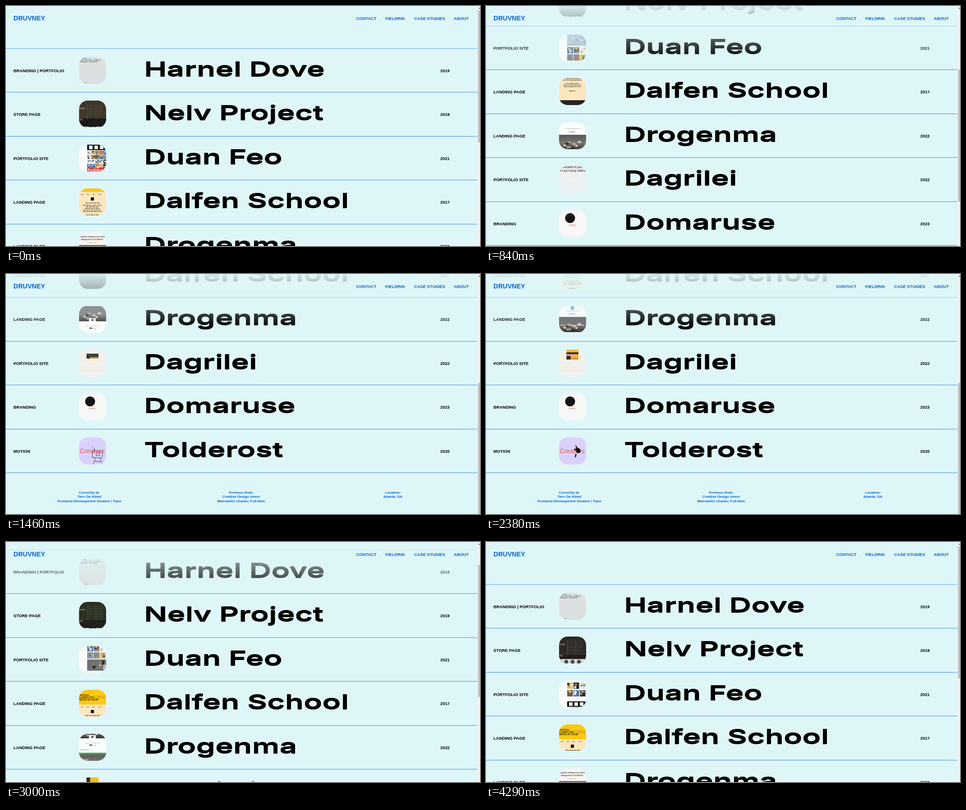
An HTML page with a canvas that plays this animation: 1051x533 px, repeating every 4360 ms.

```html
<!DOCTYPE html>
<html lang="en">
<head>
<meta charset="utf-8">
<title>Portfolio index</title>
<style>
  html, body { margin: 0; width: 100%; height: 100%; overflow: hidden; background: #dff6f9; }
  canvas { display: block; width: 100vw; height: 100vh; }
</style>
</head>
<body>
<canvas id="stage" width="1051" height="533"></canvas>
<script>
const ctx = document.getElementById('stage').getContext('2d');
const W = 1051, H = 533, LOOP = 4360;
const BG = '#dff6f9', BLUE = '#0564cf', LINE = '#3a8adb';
const SANS = '"Liberation Sans", Arial, sans-serif';
const MONO = '"Liberation Mono", monospace';
const WIDE = 'Inter, "Open Sans", sans-serif';
const TOP = 94, PITCH = 97.5, MAX_SCROLL = 432.5;
const THUMB = { x: 162, dy: 19, size: 60, r: 19 };

const rows = [
  ['BRANDING | PORTFOLIO', 'Harnel Dove', '2019', studioThumb],
  ['STORE PAGE', 'Nelv Project', '2019', storeThumb],
  ['PORTFOLIO SITE', 'Duan Feo', '2021', collageThumb],
  ['LANDING PAGE', 'Dalfen School', '2017', schoolThumb],
  ['LANDING PAGE', 'Drogenma', '2022', interiorThumb],
  ['PORTFOLIO SITE', 'Dagrilei', '2022', mosaicThumb],
  ['BRANDING', 'Domaruse', '2023', markThumb],
  ['MOTION', 'Tolderost', '2020', motionThumb]
];
const footer = [
  [185, ['Currently at:', 'Tarn On Allied', 'Frontend Development Student / Tutor']],
  [521.5, ['Previous Role:', 'Creative Design Intern', 'Marrowfen Charter, Full-time']],
  [858, ['Location:', 'Atlanta, GA']]
];
const nav = [[776.5, 'CONTACT'], [841, 'FIELDRIN'], [905, 'CASE STUDIES'], [993, 'ABOUT']];

// Bursts of evenly spaced refreshes: first time, last time, count.
const bursts = [
  [140, 600, 7], [680, 1150, 7], [1220, 1690, 7], [1770, 2230, 7],
  [2310, 2780, 7], [2850, 3310, 7], [3400, 3890, 8], [3960, 4290, 6]
];

function heldTime(t) {
  let held = 0;
  for (const [from, to, n] of bursts) {
    if (t < from) break;
    const step = (to - from) / (n - 1);
    held = from + Math.min(n - 1, Math.floor((t - from + 9) / step)) * step;
  }
  return held;
}

const clamp = v => Math.max(0, Math.min(1, v));
const smooth = v => { const c = clamp(v); return c * c * (3 - 2 * c); };
const rand = n => { const v = Math.sin(n * 127.1 + 11.7) * 43758.5453; return v - Math.floor(v); };

function keyed(t, keys) {
  for (let i = 1; i < keys.length; i++) {
    const [t0, v0] = keys[i - 1], [t1, v1] = keys[i];
    if (t <= t1) return v0 + (v1 - v0) * clamp((t - t0) / (t1 - t0));
  }
  return keys[keys.length - 1][1];
}

function scrollAt(t) {
  return MAX_SCROLL * (smooth((t - 347.3) / 900) - smooth((t - 2461.6) / 740));
}

function box(x, y, w, h, color) {
  ctx.fillStyle = color;
  ctx.fillRect(x, y, w, h);
}

function disc(x, y, r, color) {
  ctx.fillStyle = color;
  ctx.beginPath();
  ctx.arc(x, y, r, 0, Math.PI * 2);
  ctx.fill();
}

function text(str, x, y, font, color, align = 'left') {
  ctx.font = font;
  ctx.fillStyle = color;
  ctx.textAlign = align;
  ctx.fillText(str, x, y);
}

function poly(points, color, width) {
  ctx.beginPath();
  points.forEach(([x, y]) => ctx.lineTo(x, y));
  if (width) {
    ctx.strokeStyle = color;
    ctx.lineWidth = width;
    ctx.stroke();
  } else {
    ctx.fillStyle = color;
    ctx.fill();
  }
}

// A row of short dashes standing for very small copy.
function smallPrint(x, y, w, color, seed) {
  for (let dx = 0, i = 0; dx < w; i++) {
    const len = Math.min(w - dx, 2 + rand(seed + i) * 5);
    box(x + dx, y, len, 1, color);
    dx += len + 1.2;
  }
}

function photo(y, h, seed) {
  const g = ctx.createLinearGradient(0, y, 0, y + h);
  g.addColorStop(0, '#55575a');
  g.addColorStop(0.55, '#77746e');
  g.addColorStop(1, '#34332f');
  ctx.fillStyle = g;
  ctx.fillRect(0, y, 60, h);
  for (let i = 0; i < 9; i++) {
    const shade = ['#2b2c2d', '#a29a8d', '#c6c3bc'][Math.floor(rand(seed + i) * 3)];
    box(rand(seed + i + 20) * 54, y + h * (0.35 + rand(seed + i + 40) * 0.5), 3 + rand(seed + i + 60) * 8, h * 0.13, shade);
  }
}

// Thumbnails draw in a 60 by 60 box whose corner is the origin.
function studioThumb() {
  box(0, 0, 60, 60, '#dcdfe0');
  const font = 'bold 4.4px ' + MONO;
  text('YOUR', 5, 4, font, '#444');
  text('UNIQUE DESIGN STUDIO', -6, 8, font, '#444');
  text('DIGITAL PARTNER', 1, 12, font, '#444');
  box(20, 20, 0.6, 22, '#cbcfd0');
  smallPrint(27, 22, 8, '#c6cacb', 3);
  smallPrint(40, 27, 7, '#c6cacb', 6);
  box(12, 57, 5, 1, '#777');
}

function storeThumb(t) {
  const early = t < 700, late = t > 3300;
  box(0, 0, 60, 60, early ? '#40362a' : late ? '#2c2924' : '#2a2f22');
  box(0, 38, 60, 22, early ? '#1a1c1c' : '#211f1b');
  for (let i = 0; i < 6; i++) {
    smallPrint(19, 10 + i * 4.5, 34, early ? '#6b4c38' : '#575a4b', i * 9);
  }
  box(18, 8, 0.6, 34, '#62635a');
  box(37, 8, 0.6, 34, '#55564e');
  box(0, 38, 60, 0.7, '#62635a');
  text('calendar', -9, 19, '6px ' + SANS, '#c9c8c1');
  text('goods', -8, 44, '6px ' + SANS, '#c9c8c1');
  if (t > 3900) {
    box(0, 50, 60, 10, '#deded9');
    for (let i = 0; i < 4; i++) disc(2 + i * 14, 56, 4.5, '#4b4c4f');
  } else {
    box(0, 58, 60, 2, BG);
    smallPrint(22, 58, 16, '#333', 4);
  }
}

function collageThumb(t) {
  const page = 226, left = 18;
  const offset = keyed(t, [[0, 0], [840, 62], [2200, 86], [3000, 92], [3550, 120], [4290, 180]]);
  const tones = ['#2b2b2b', '#e4e2dd', '#b9854e', '#4a77b0', '#8c8f91', '#d8c27a', '#f1f1f1', '#6b5a48'];
  const tone = n => tones[Math.floor(rand(n) * tones.length)];
  const tiles = (y, count, cell, gap, seed) => {
    for (let r = 0; r < count; r++) {
      for (let c = 0; c < 42 / cell; c++) {
        const n = seed + r * 13 + c * 3, x = left + c * cell, top = y + r * (cell + gap);
        box(x, top, cell - gap / 2, cell, tone(n));
        for (let i = 1; i < 4; i++) {
          box(x + rand(n + i) * cell * 0.6, top + rand(n + i * 2) * cell * 0.6, cell * 0.35, cell * 0.35, tone(n + i * 7));
        }
      }
    }
  };
  box(0, 0, 60, 60, '#fbfcfc');
  smallPrint(4, 9, 8, '#d5dadb', 2);
  smallPrint(3, 30, 10, '#dde1e2', 5);
  for (const y of [-offset, page - offset]) {
    box(left, y, 42, 12, '#0c0c0c');
    for (let i = 0; i < 3; i++) box(left + 4 + i * 12, y + 2, 8, 8, '#eceeed');
    tiles(y + 13, 4, 9, 1, 30);
    box(left, y + 52, 42, 10, '#d81e1e');
    text('hobby', left + 1, y + 60, 'bold 11px ' + SANS, '#fff');
    box(left, y + 62, 42, 25, '#a9bccd');
    for (let i = 0; i < 12; i++) box(left + rand(i) * 38, y + 64 + rand(i + 30) * 20, 5, 2, i % 2 ? '#d4dce2' : '#7d94a8');
    tiles(y + 90, 2, 14, 2, 71);
    box(left, y + 122, 42, 25, '#6d7276');
    for (let i = 0; i < 10; i++) box(left + rand(i + 7) * 36, y + 123 + rand(i + 17) * 17, 6, 6, ['#28292b', '#b8bbba', '#9a8055'][i % 3]);
    text('&', left + 25, y + 161, '13px "Liberation Serif", serif', '#333');
    text('68', left + 16, y + 176, '16px "Liberation Serif", serif', '#333');
    for (let i = 0; i < 4; i++) smallPrint(left + 1, y + 152 + i * 6, 15, '#9da0a1', i * 8);
    tiles(y + 184, 2, 14, 3, 120);
  }
}

function schoolThumb(t) {
  const offset = keyed(t, [[0, 25], [840, 72], [1460, 100], [2380, 42], [3000, 0], [4290, 0]]);
  const y = -offset, ink = '#17150f';
  box(0, 0, 60, 60, '#fbe6bd');
  box(0, y, 60, 33, '#ffc90f');
  ['PRACTICAL', 'CLASSES FOR', 'PEOPLE OF COLOR'].forEach((line, i) =>
    text(line, i ? -1 : -3, y + 14 + i * 5, 'bold 4.5px ' + SANS, ink));
  smallPrint(31, y + 14, 28, '#8b6c12', 2);
  smallPrint(31, y + 18, 28, '#8b6c12', 7);
  for (let i = 0; i < 4; i++) box(4 + i * 13, y + 38, 5, 1, '#5b4f34');
  box(26, y + 45, 7, 7, ink);
  smallPrint(14, y + 57, 32, ink, 4);
  for (let i = 0; i < 8; i++) {
    const w = 24 + rand(i + 4) * 18;
    smallPrint(29.5 - w / 2, y + 62 + i * 3.5 + (i > 4 ? 4 : 0), w, ink, i * 11);
  }
  smallPrint(22, y + 100, 14, ink, 8);
  box(0, y + 121, 60, 60, '#242326');
}

function interiorThumb(t) {
  const offset = keyed(t, [[0, 0], [840, 0], [1460, 27], [2380, 2], [3000, 52], [3550, 52], [4290, 0]]);
  const y = -offset, greeting = t < 500 || t > 3950;
  box(0, 0, 60, 60, greeting ? '#f6f5f2' : '#fbfcfc');
  photo(y + 28, 34, 12);
  box(0, y + 62, 60, 32, '#fbfcfc');
  photo(y + 94, 34, 88);
  box(0, y + 94, 60, 4, '#4c9a53');
  if (greeting) {
    box(0, y, 60, 28, '#f6f5f2');
    text('beautiful software for interior', 29.5, y + 11, '5px ' + SANS, '#222', 'center');
    text('designers & architects.', 29.5, y + 17, '5px ' + SANS, '#222', 'center');
    box(34, y + 22, 5, 2, '#f3c533');
    smallPrint(18, y + 22, 14, '#999', 3);
  } else {
    smallPrint(14, y + 14, 32, '#a5a9aa', 6);
    smallPrint(22, y + 21, 14, '#444', 9);
  }
  if (t > 1900 && t < 2700) {
    disc(29.5, y + 8, 4.5, '#58a9d8');
    text('Presentations, perfected', 29.5, y + 48, 'bold 4.4px ' + SANS, '#fff', 'center');
  } else if (t > 1000 && !greeting) {
    box(22, y + 55, 15, 12, '#fff');
    box(27, y + 57, 5, 4, '#4c4d4f');
  }
  smallPrint(14, y + 72, 32, '#b4b8b9', 4);
  box(23, y + 76, 6, 2, '#222');
  smallPrint(32, y + 77, 6, '#999', 2);
  smallPrint(3, y + 87, 18, '#888', 7);
}

function mosaicThumb(t) {
  box(0, 0, 60, 60, t < 1150 ? '#eef0f1' : '#f2f0ec');
  if (t < 1150) {
    text('dedicated to you', 3, 5, '6.6px ' + SANS, '#222');
    text('in your busy calendar', 3, 12.5, '6.6px ' + SANS, '#222');
    smallPrint(16, 23, 28, '#cfe9f0', 5);
    return;
  }
  if (t < 1900) {
    box(16.5, 9, 26.5, 11, '#343638');
    box(24, 16.5, 19, 3.5, '#d99a2b');
    smallPrint(19, 12, 22, '#66686a', 3);
  } else if (t < 2700) {
    box(16.5, 0, 26.5, 22, '#f4b62c');
    box(16.5, 6, 26.5, 4, '#2b2b2d');
    box(16.5, 10, 9, 12, '#2b2b2d');
    box(16.5, 10, 20, 4, '#e9a2a3');
    box(25.5, 18, 17.5, 4, '#e58a2f');
  } else {
    box(16.5, 0, 26.5, 22, '#f8bd16');
    box(16.5, 0, 8, 22, '#27282a');
  }
  for (let i = 0; i < 3; i++) smallPrint(2, 40 + i * 4, 54, '#e4e3df', i * 9);
}

function markThumb() {
  box(0, 0, 60, 60, '#f7f7f5');
  disc(24.5, 18, 11, '#141414');
  text('FORM', 28.5, 36, '5px ' + SANS, '#e2674c', 'center');
}

function motionThumb(t) {
  box(0, 0, 60, 60, '#d9d1fb');
  text('Creators', 1.5, 35, '14.3px ' + SANS, '#ee5a47');
  if (Math.floor(t / 600) % 2) {
    poly([[36, 15], [40, 22], [47, 26], [48, 33], [41, 35], [37, 30], [32, 25], [38, 25]], '#111');
    poly([[36, 37], [39, 36], [37, 45], [35, 43]], '#111');
  } else {
    poly([[30, 30], [52, 31], [51, 46], [29, 44], [30, 30]], '#222', 0.8);
    poly([[36, 45], [32, 58]], '#222', 0.8);
    poly([[46, 46], [51, 58]], '#222', 0.8);
    poly([[34, 53], [49, 54]], '#222', 0.8);
    poly([[38, 35], [46, 34], [45, 41], [38, 40], [38, 35]], '#222', 0.8);
    poly([[29, 21], [35, 28], [33, 30]], '#222', 0.8);
  }
}

// The display face is an extended grotesque: one width factor for every title,
// and stacked passes that thicken the horizontal strokes.
function title(str, y) {
  ctx.save();
  ctx.translate(306, y);
  ctx.scale(1.54, 1);
  for (let rise = 0; rise <= 2; rise++) text(str, 0, -rise, '600 44px ' + WIDE, '#000');
  ctx.restore();
}

function drawRow([label, name, year, thumb], y, t) {
  const small = 'bold 9.33px ' + SANS;
  text(label, 16.5, y + 53, small, '#000');
  text(year, 963, y + 53, small, '#000');
  title(name, y + 63);
  ctx.save();
  ctx.translate(THUMB.x, y + THUMB.dy);
  ctx.beginPath();
  ctx.roundRect(0, 0, THUMB.size, THUMB.size, THUMB.r);
  ctx.clip();
  thumb(t);
  ctx.restore();
}

function drawFooter(y) {
  for (const [x, lines] of footer) {
    lines.forEach((line, i) => text(line, x, y + i * 9.5, 'bold 7.8px ' + SANS, BLUE, 'center'));
  }
}

function drawHeader() {
  const fade = ctx.createLinearGradient(0, 0, 0, 120);
  fade.addColorStop(0, 'rgba(223,246,249,0.94)');
  fade.addColorStop(1, 'rgba(223,246,249,0)');
  ctx.fillStyle = fade;
  ctx.fillRect(0, 0, 1046, 120);
  text('DRUVNEY', 16.5, 32, 'bold 14.4px ' + SANS, BLUE);
  for (const [x, label] of nav) text(label, x, 31, 'bold 9.33px ' + SANS, BLUE);
}

function drawScrollbar(scroll) {
  box(1046, 0, 5, H, '#f0f2f2');
  poly([[1047.5, 6], [1049.5, 3.5], [1051.5, 6]], '#505050');
  box(1046.5, 10 + scroll * 0.537, 4.5, 293, '#bfc1c1');
}

function draw(t) {
  const scroll = scrollAt(t);
  const rowTop = i => Math.floor(TOP + i * PITCH - scroll);
  box(0, 0, W, H, BG);
  rows.forEach((row, i) => {
    const y = rowTop(i);
    if (y > -PITCH && y < H) drawRow(row, y, t);
  });
  for (let i = 0; i <= rows.length; i++) box(0, rowTop(i), 1045, 1, LINE);
  drawFooter(920 - scroll);
  drawHeader();
  drawScrollbar(scroll);
}

const start = performance.now();
function tick() {
  draw(heldTime((performance.now() - start) % LOOP));
  requestAnimationFrame(tick);
}
tick();
</script>
</body>
</html>
```
